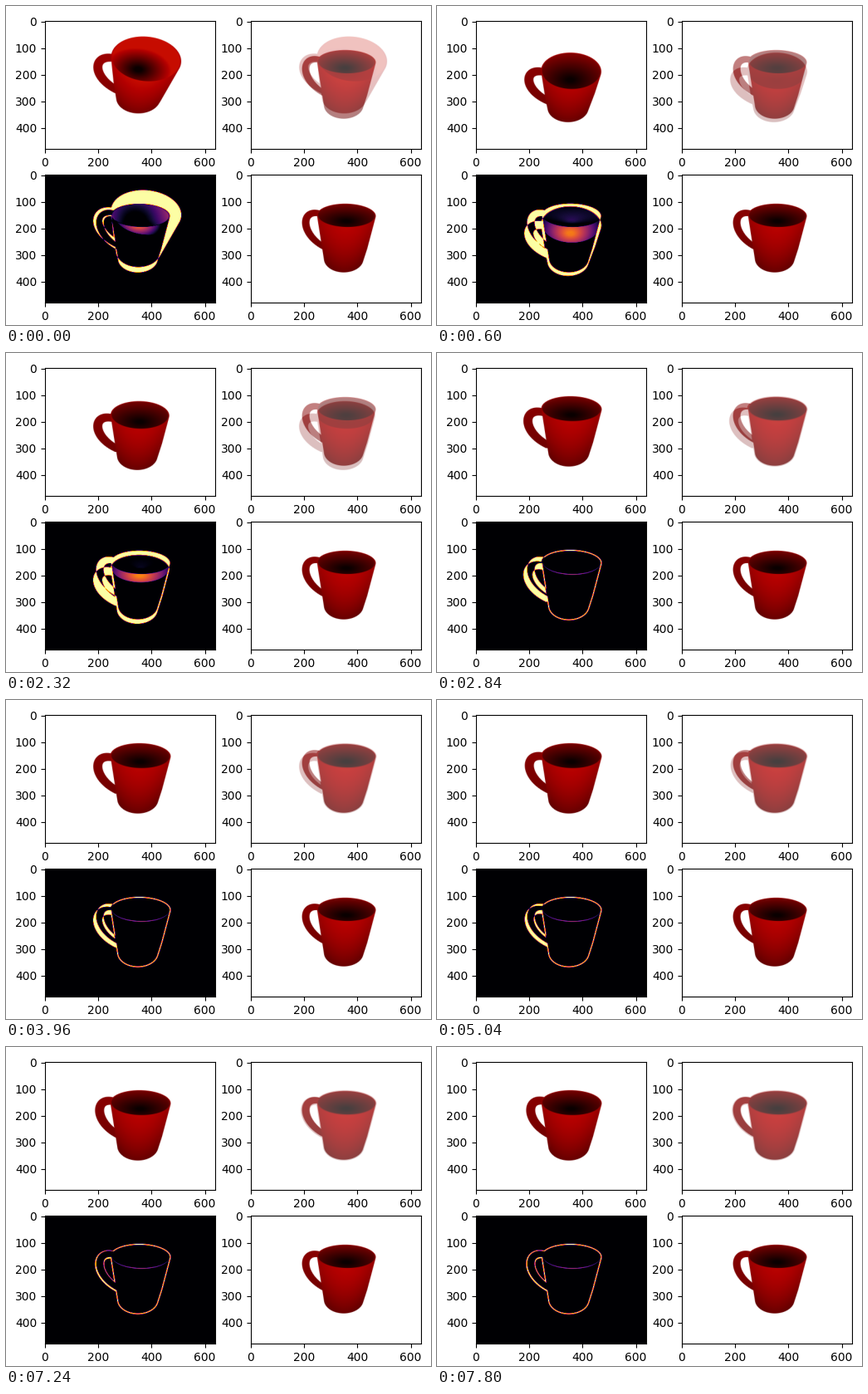
These frames come from a looping animation (512 px wide and 384 px high, 8000 ms). A matplotlib script:

```python
import numpy as np
import matplotlib.pyplot as plt
from matplotlib.animation import FuncAnimation

W, H, DPI = 512, 384, 100
INTERVAL, LOOP = 40, 8000
FIRST, STEP = 40, 560  # the start pose is brief, then one pose per STEP ms
EXTENT = (-0.5, 639.5, 479.5, -0.5)
X, Y = np.meshgrid(np.arange(320) * 2 + 0.5, np.arange(240) * 2 + 0.5)


def coverage(distance):
    return np.clip(0.5 - distance / 2, 0, 1)


def support(nx, ny, cx, cy, rx, ry, tilt=0):
    """Reach of an ellipse along the direction (nx, ny)."""
    c, s = np.cos(tilt), np.sin(tilt)
    return cx * nx + cy * ny + np.hypot(rx * (nx * c + ny * s), ry * (ny * c - nx * s))


def body_distance(rim, base):
    """Signed distance to the convex hull of two ellipses."""
    dist = np.full(X.shape, -1e9)
    for a in np.linspace(0, 2 * np.pi, 120, endpoint=False):
        nx, ny = np.cos(a), np.sin(a)
        reach = max(support(nx, ny, *rim), support(nx, ny, *base))
        np.maximum(dist, X * nx + Y * ny - reach, out=dist)
    return dist


def handle_distance(left, top, join_x, join_y, grow):
    """Signed distance to a thick Bezier curve between the two corners."""
    curve = np.array([[0.84, 0.094], [-0.02, -0.06], [-0.09, 0.57], [0.95, 0.92]])
    curve = curve * [join_x - left, join_y - top] + [left, top]
    dist = np.full(X.shape, 1e9)
    for t in np.linspace(0, 1, 50):
        weights = [(1 - t) ** 3, 3 * t * (1 - t) ** 2, 3 * t * t * (1 - t), t ** 3]
        px, py = np.array(weights) @ curve
        radius = 11 + 3 * np.sin(np.pi * t) + grow
        np.minimum(dist, np.hypot(X - px, Y - py) - radius, out=dist)
    return dist


def render(dx=0, dy=0, scale=1, pitch=0, yaw=0, kick=0, grow=0):
    """Return the RGB picture of the mug, its silhouette and its red channel."""
    far = np.sqrt(scale)
    cx, cy, tilt = 357 + dx, 155 + dy, 0.02 + 0.08 * kick
    rx = 110 * scale + grow
    ry = 110 * scale * (0.4 + 0.23 * pitch) + grow
    base_x, base_y = cx - 10 - 19 * kick, cy + (161 - 28 * pitch) * far
    base_rx, base_ry = 74 * far + grow, 51 * far + grow

    body = coverage(body_distance((cx, cy, rx, ry, tilt),
                                  (base_x, base_y, base_rx, base_ry)))
    grip = coverage(handle_distance(cx - (168 + 12 * yaw) * scale,
                                    cy - 20 + 20 * yaw,
                                    cx - (81 + 7 * yaw) * scale,
                                    cy + (128 + 16 * yaw - 20 * pitch) * scale, grow))
    mask = np.maximum(body, grip)

    # The outside fades towards the foot and the sides.
    v = np.clip((Y - cy) / (base_y + base_ry - cy), 0, 1)
    u = (X - cx - v * (base_x - cx)) / (rx + v * (base_rx - rx))
    gain = 0.98 + 0.14 * kick
    outside = 0.76 * gain * (1 - 0.2 * np.clip(u * u, 0, 1) - 0.45 * v ** 1.8)
    red = body * outside + (1 - body) * gain * (0.54 - 0.14 * v)

    # The inside is darkest low in the opening.
    c, s = np.cos(tilt), np.sin(tilt)
    ex = ((X - cx) * c + (Y - cy) * s) / (rx * 0.97)
    ey = ((Y - cy) * c - (X - cx) * s) / (ry * 0.97)
    opening = coverage((np.hypot(ex, ey) - 1) * ry)
    depth = np.clip((np.hypot(ex + 0.2 * kick, ey - 0.5) - 0.1) / 1.3, 0, 1)
    inside = np.minimum(0.04 + (0.4 + 0.7 * kick) * depth, 0.78)
    red = opening * inside + (1 - opening) * red

    green = np.clip(red - 0.7, 0, 1) * 0.6
    mug = np.dstack([red, green, np.zeros_like(red)])
    alpha = mask[..., None]
    return mug * alpha + (1 - alpha), mask, red


def to_bytes(rgb):
    return (np.clip(rgb, 0, 1) * 255).astype(np.uint8)


goal_rgb, goal_mask, goal_red = render()


def make_step(n):
    """Pictures for step n: the body settles by step 6, the handle swings on."""
    m = min(n, 6)
    kick = np.exp(-1.2 * n)
    sink = np.sin(np.pi * (m - 0.4) / 5.6)
    swing = 0.2 + 0.8 * np.sin(np.pi * m / 12)
    rgb, mask, red = render(
        dx=20 * kick - 4 * sink,
        dy=44 * sink,
        scale=1 + 0.17 * kick - 0.07 * sink * m / 6,
        pitch=np.cos(np.pi * m / 12),
        yaw=swing * np.exp(-((n - m) / 4) ** 1.5),
        kick=kick,
        grow=3)
    overlay = 0.5 * goal_rgb + 0.25 * rgb + 0.25
    shade = np.clip(np.abs(red - goal_red) - 0.12, 0, 1) * 1.3
    shade *= np.minimum(mask, goal_mask)
    outline = np.clip(1.6 * np.abs(mask - goal_mask), 0, 1)
    return to_bytes(rgb), to_bytes(overlay), np.maximum(outline, shade)


def step_at(ms):
    return 0 if ms < FIRST else 1 + (ms - FIRST) // STEP


steps = [make_step(n) for n in range(step_at(LOOP - 1) + 1)]

plt.rcParams["font.family"] = "DejaVu Sans"
fig = plt.figure(figsize=(W / DPI, H / DPI), dpi=DPI, facecolor="white")


def panel(left, top, data, **kw):
    width, height = 205.4, 154.05
    ax = fig.add_axes([left / W, 1 - (top + height) / H, width / W, height / H])
    image = ax.imshow(data, extent=EXTENT, aspect="auto", **kw)
    ax.set_xticks(range(0, 601, 200))
    ax.set_yticks(range(0, 401, 100))
    return image


current = panel(46.8, 18.4, steps[0][0])
overlay = panel(294.8, 18.4, steps[0][1])
error = panel(46.8, 203.4, steps[0][2], cmap="inferno", vmin=0, vmax=1)
panel(294.8, 203.4, to_bytes(goal_rgb))


def update(frame):
    images = (current, overlay, error)
    for image, data in zip(images, steps[step_at(frame * INTERVAL)]):
        image.set_data(data)
    return images


anim = FuncAnimation(fig, update, frames=LOOP // INTERVAL, interval=INTERVAL,
                     repeat=True, repeat_delay=0, blit=False)
plt.show()
```
